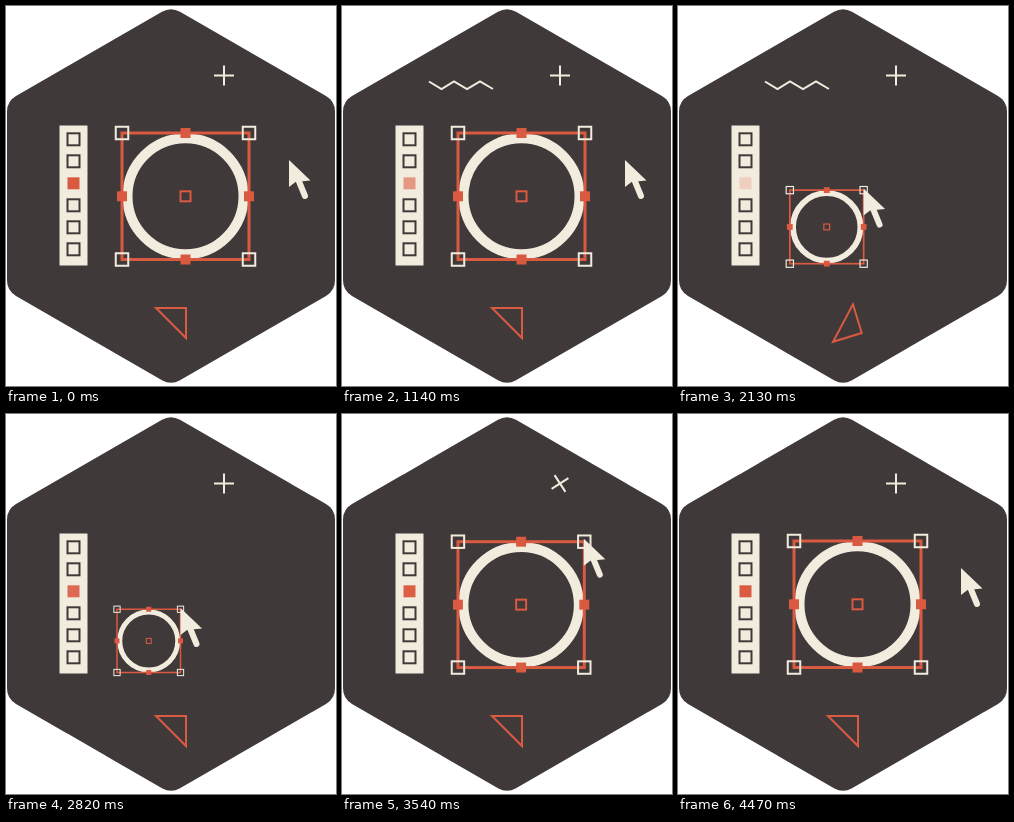
These frames come from a looping animation (330 by 380 pixels, 4500 ms). An HTML page:

```html
<!DOCTYPE html>
<html lang="en">
<head>
<meta charset="utf-8">
<title>Resize tool</title>
<style>
  html, body { margin: 0; height: 100%; overflow: hidden; background: #fff; }
  svg { display: block; width: 330px; height: 380px; }
  .line { fill: none; stroke-width: 2; }
  .cream { stroke: #f2ecdf; }
  .red { stroke: #da5a41; }
  .dark { stroke: #403939; }
  .cream-fill { fill: #f2ecdf; }
  .red-fill { fill: #da5a41; }
</style>
</head>
<body>
<svg viewBox="0 0 330 380">
  <polygon points="165,21.4 311,105.7 311,274.3 165,358.6 19,274.3 19,105.7"
    fill="#403939" class="dark" stroke-width="36" stroke-linejoin="round"/>

  <rect class="cream-fill" x="53.5" y="119.5" width="28" height="140"/>
  <g id="swatches"></g>
  <rect id="blink" class="red-fill" x="61.5" y="171.3" width="12" height="12"/>

  <path id="zigzag" class="line cream" pathLength="1" stroke-dasharray="1 2"
    d="M87 75.5 99.5 83 112 75.5 125 83 138 75.5 151 83"/>
  <path id="plus" class="line cream" d="M-10 0H10M0-10V10"/>
  <path id="triangle" class="line red" d="M-15-15H15V15Z"/>

  <g id="shape">
    <circle class="cream" cx="179.5" cy="190.3" r="58" fill="none" stroke-width="10"/>
    <rect class="red" x="116" y="127" width="127" height="126.5" fill="none" stroke-width="3"/>
    <rect class="line red" x="174.5" y="185.3" width="10" height="10"/>
    <g id="handles"></g>
  </g>

  <g id="cursor" class="cream-fill">
    <path d="M0 0V27L6.500 22 21.500 20.500Z"/>
    <path class="cream" d="M9 19 16 36" stroke-width="6" stroke-linecap="round"/>
  </g>
</svg>
<script>
const LOOP = 4500, BLINK = 900;
const $ = id => document.getElementById(id);

const square = (x, y, size, cls) =>
  `<rect class="${cls}" x="${x - size / 2}" y="${y - size / 2}" width="${size}" height="${size}"/>`;

$('swatches').innerHTML = [0, 1, 3, 4, 5]
  .map(i => square(67.5, 133.3 + 22 * i, 12, 'line dark')).join('');

const xs = [116, 179.5, 243], ys = [127, 190.3, 253.5];
$('handles').innerHTML = ys.flatMap((y, row) => xs.map((x, col) => {
  if (row === 1 && col === 1) return '';
  return row === 1 || col === 1
    ? square(x, y, 10, 'red-fill')
    : square(x, y, 12.5, 'line cream');
})).join('');

const progress = (t, from, to) => Math.min(1, Math.max(0, (t - from) / (to - from)));
const smooth = (t, from, to) => (1 - Math.cos(Math.PI * progress(t, from, to))) / 2;
const accelerate = (t, from, to) => progress(t, from, to) ** 2.72;
const mix = (a, b, k) => a + (b - a) * k;
const place = (id, transform) => $(id).setAttribute('transform', transform);

function draw(t) {
  const phase = t % BLINK;
  const fade = progress(phase, 0, 370) - progress(phase, 570, BLINK);
  $('blink').setAttribute('opacity', 1 - fade ** 2);

  $('zigzag').setAttribute('stroke-dashoffset', 1 - smooth(t, 590, 1110) - smooth(t, 2220, 2730));
  $('zigzag').setAttribute('visibility', t > 590 && t < 2730 ? 'visible' : 'hidden');

  place('triangle', `translate(165 317) rotate(${360 * accelerate(t, 1380, 2730)})`);
  place('plus', `translate(218 69.5) rotate(${360 * accelerate(t, 2855, 4205)})`);

  // The shape shrinks toward its lower left while the cursor drags a corner.
  const shrink = smooth(t, 1800, 2250) - smooth(t, 3120, 3570);
  place('shape', `translate(106 263.5) scale(${1 - shrink / 2}) translate(-106 -263.5)`);

  const grab = smooth(t, 1380, 1800) - smooth(t, 3570, 4020);
  const x = mix(283, 242.5, grab) - 68 * shrink;
  const y = mix(154, 124, grab) + 70 * shrink;
  place('cursor', `translate(${x} ${y})`);
}

const start = performance.now();
function tick() {
  draw((performance.now() - start) % LOOP);
  requestAnimationFrame(tick);
}
tick();
</script>
</body>
</html>
```
